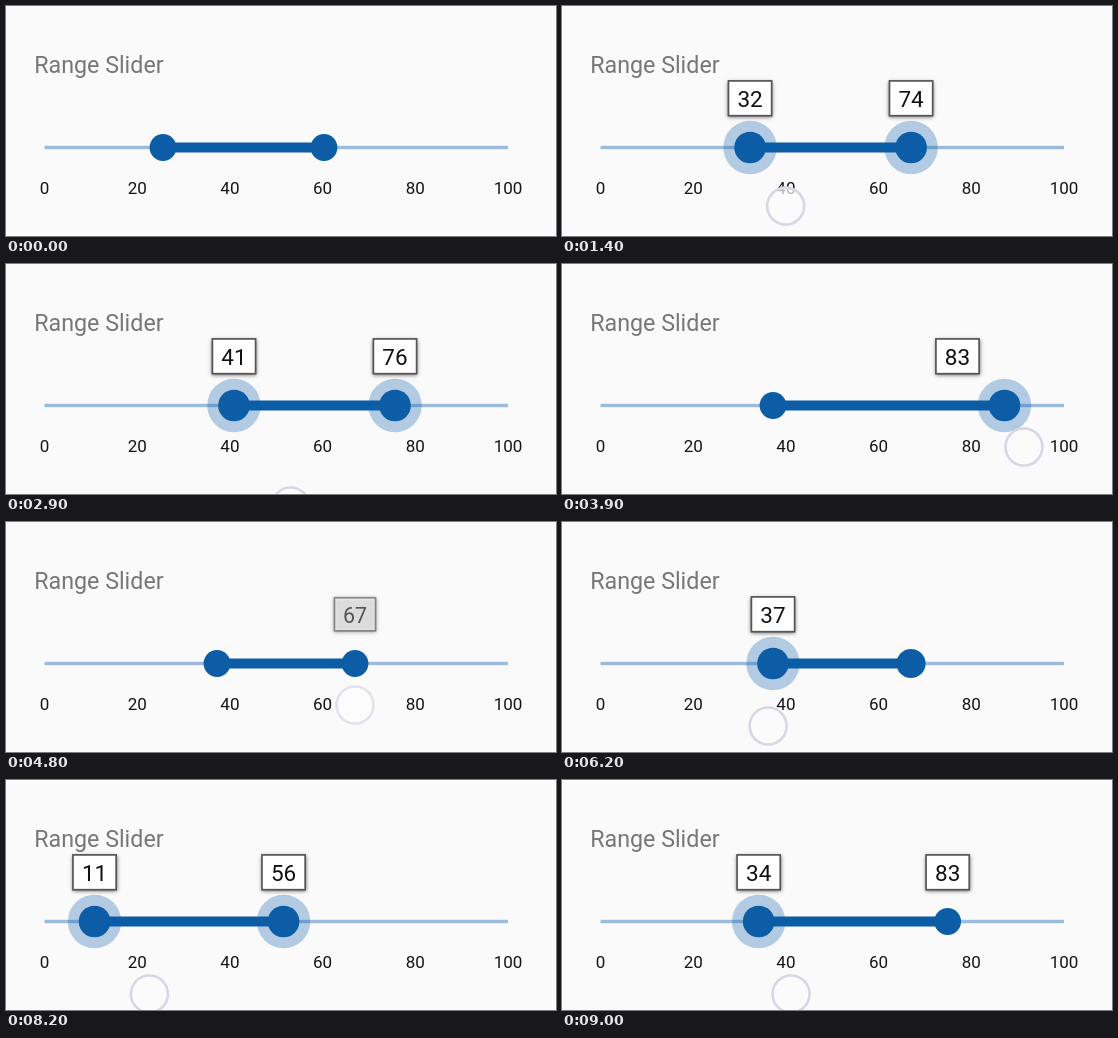
These frames come from a looping animation (550x230 px, 9.1 s). An HTML page with a canvas:

```html
<!DOCTYPE html>
<html lang="en">
<head>
<meta charset="utf-8">
<title>Range Slider</title>
<style>
  html, body { margin: 0; width: 100%; height: 100%; overflow: hidden; background: #fafafa; }
  canvas { display: block; width: 550px; height: 230px; }
</style>
</head>
<body>
<canvas id="stage" width="550" height="230"></canvas>
<script>
const ctx = document.getElementById('stage').getContext('2d');
const LOOP = 9100, STEP = 100;
const LEFT = 38.5, RIGHT = 502, TRACK_Y = 141.5;
const BLUE = '#0c5da6';

// The drags: when the finger is down and which thumbs it moves.
const drags = [
  { start: 400, end: 3100, low: true, high: true },
  { start: 3700, end: 4700, high: true },
  { start: 5300, end: 6400, low: true },
  { start: 6500, end: LOOP, low: true, high: true }
];

// Cosine easing between turning points [time, value].
function swing(...turns) {
  return t => {
    const next = turns.findIndex(turn => turn[0] > t);
    if (next === 0) return turns[0][1];
    if (next < 0) return turns[turns.length - 1][1];
    const [t0, a] = turns[next - 1], [t1, b] = turns[next];
    return a + (b - a) * (1 - Math.cos(Math.PI * (t - t0) / (t1 - t0))) / 2;
  };
}

const lowX = swing(
  [400, 157], [1000, 278], [1820, 91], [2550, 277], [2800, 228], [2950, 228],
  [3150, 151], [3300, 211], [5300, 211], [5500, 270], [5900, 93], [6100, 211],
  [6200, 211], [6500, 160], [6700, 298], [6900, 62], [7550, 290], [8250, 86],
  [8610, 297], [9415, 86]);
const highAlone = swing([3700, 372], [4000, 466], [4400, 264], [4700, 349]);
const highX = t => t < 3600 ? lowX(t) + 161 : t < 6500 ? highAlone(t) : lowX(t) + 189;
const fingerY = swing([400, 178], [2900, 242], [3700, 183], [5300, 183],
  [6200, 204], [7300, 186], [8200, 214]);

// 0..1: quick rise when a drag starts, fade lasting `out` after it ends.
function presence(t, { start, end }, out) {
  if (t < start) return 0;
  if (t > end) return Math.max(0, 1 - (t - end) / out);
  return Math.min(1, (t - start + STEP) / 200);
}
const active = (t, thumb, out) =>
  Math.max(...drags.filter(d => d[thumb]).map(d => presence(t, d, out)));

function disc(x, y, r, fill) {
  ctx.beginPath();
  ctx.arc(x, y, r, 0, 2 * Math.PI);
  ctx.fillStyle = fill;
  ctx.fill();
}

function bar(x0, x1, thick, fill) {
  ctx.fillStyle = fill;
  ctx.fillRect(x0, TRACK_Y - thick / 2, x1 - x0, thick);
}

function write(text, x, y, size, fill, align = 'center') {
  ctx.font = `${size}px Roboto, sans-serif`;
  ctx.textAlign = align;
  ctx.fillStyle = fill;
  ctx.fillText(text, x, y);
}

function label(x, position, alpha) {
  if (!alpha) return;
  const scale = 0.85 + 0.15 * alpha;
  const value = Math.round((position - LEFT) / (RIGHT - LEFT) * 100);
  ctx.save();
  ctx.globalAlpha = alpha;
  ctx.translate(x, 92.5);
  ctx.scale(scale, scale);
  ctx.save();
  ctx.shadowColor = 'rgba(0,0,0,.6)';
  ctx.shadowBlur = 4;
  ctx.shadowOffsetY = 1;
  ctx.fillStyle = '#fff';
  ctx.fillRect(-22, -18, 44, 35.5);
  ctx.restore();
  ctx.lineWidth = 1.7;
  ctx.strokeStyle = '#555';
  ctx.strokeRect(-21.6, -17.6, 43.2, 34.8);
  write(value, 0, 8.5, 22.5, '#111');
  ctx.restore();
}

function thumb(x, press) {
  disc(x, TRACK_Y, 26.7 * press, 'rgba(11,95,168,.3)');
  disc(x, TRACK_Y, 13.4 + 2.4 * press, BLUE);
}

// The finger leads the thumbs; a pair is held by the bar between them.
function finger(t) {
  for (const drag of drags) {
    const alpha = presence(t, drag, 300);
    if (!alpha) continue;
    const ahead = t + 60;
    const x = drag.low ? lowX(ahead) + (drag.high ? 57 : 0) : highX(ahead);
    ctx.save();
    ctx.globalAlpha = alpha;
    disc(x, fingerY(t), 18.5, 'rgba(252,252,254,.7)');
    ctx.lineWidth = 2.6;
    ctx.strokeStyle = '#d8d7e3';
    ctx.stroke();
    ctx.restore();
  }
}

function draw(t) {
  const low = lowX(t), high = highX(t);

  ctx.fillStyle = '#fafafa';
  ctx.fillRect(0, 0, 550, 230);
  write('Range Slider', 28.2, 67, 23.25, '#777', 'left');
  for (let v = 0; v <= 100; v += 20) {
    write(v, LEFT + (RIGHT - LEFT) * v / 100, 188, 17, '#151515');
  }

  bar(LEFT, RIGHT, 3.4, '#9dbbdc');
  bar(low, high, 10, BLUE);
  thumb(low, active(t, 'low', STEP));
  // The idle thumb lights up just before a pair drag takes over.
  thumb(high, active(t < 6000 ? t : t + 300, 'high', STEP));

  // Labels trail thumbs moving right; their numbers lag a little.
  const before = t - STEP, recent = t - 40;
  label(Math.min(low, lowX(before)), Math.min(low, lowX(recent)), active(t, 'low', 300));
  label(Math.min(high, highX(before)), Math.max(highX(before), highX(recent)),
    active(t, 'high', 300));
  finger(t);
}

function tick() {
  const t = performance.now() % LOOP;
  draw(Math.floor(t / STEP) * STEP);
  requestAnimationFrame(tick);
}
tick();
</script>
</body>
</html>
```
